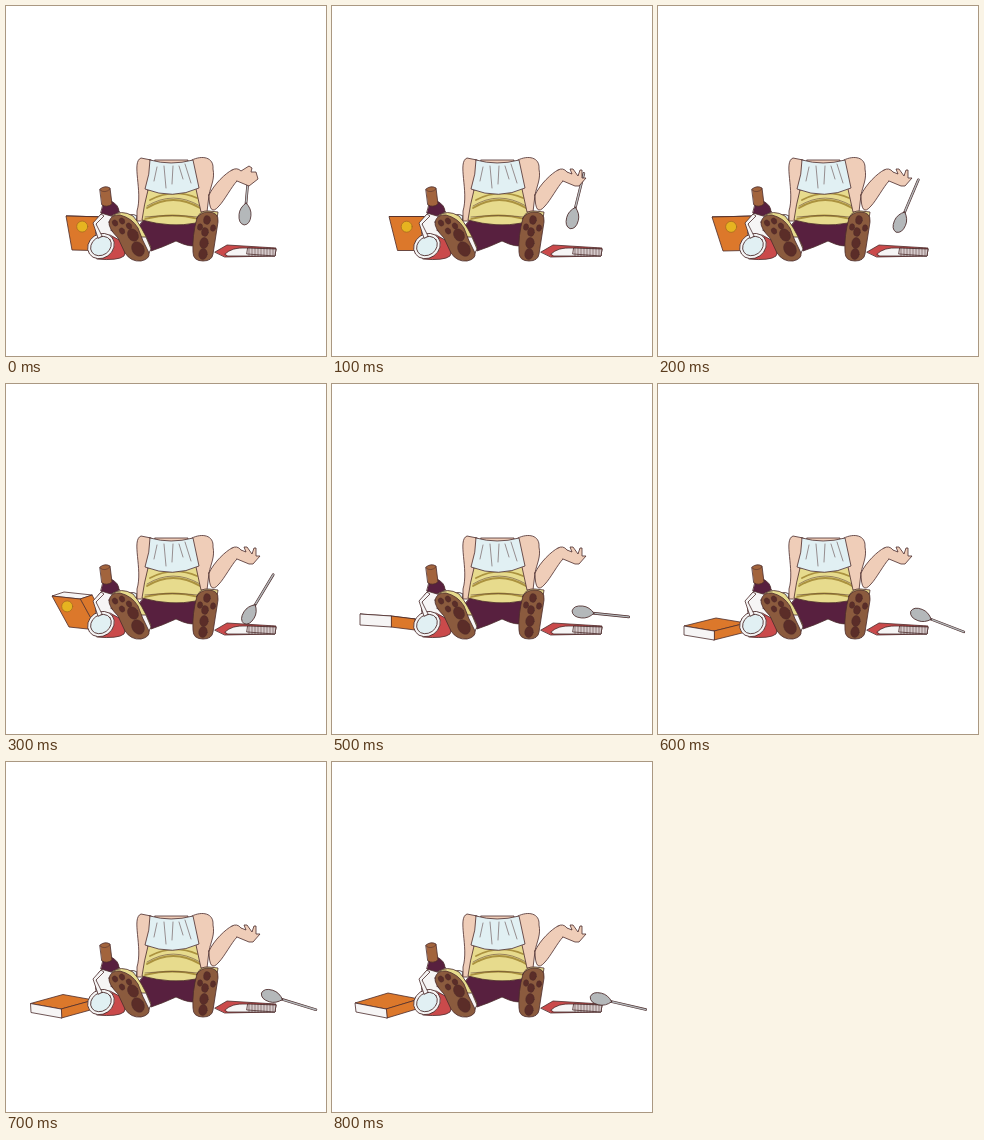
Recreate the animation shown at these times as an HTML page. Size 320x350 px, loop 0.9 s.

```html
<!DOCTYPE html>
<html lang="en">
<head>
<meta charset="utf-8">
<title>Dropped snacks</title>
<style>
html, body { margin: 0; width: 100%; height: 100%; overflow: hidden; background: #fff; }
svg { display: block; width: 320px; height: 350px; stroke: #4b2b2b; stroke-width: .8; stroke-linejoin: round; stroke-linecap: round; }
.line { fill: none; stroke-width: .5; }
.skin { fill: #efcdb8; }
.cloth { fill: #e1f0f3; }
.shirt { fill: #e7db8d; }
.plum { fill: #58203f; }
.sole { fill: #8b5b3e; }
.pad { fill: #5b2d28; stroke-width: .4; }
.white { fill: #f6f5f5; }
.orange { fill: #dc782b; }
.red { fill: #ca4a4b; }
.metal { fill: #b4b8ba; }
.cork { fill: #a2643d; }
.band { stroke: #ab923f; stroke-width: 1.8; fill: none; }
</style>
</head>
<body>
<svg viewBox="0 0 320 350">
  <g id="box">
    <polygon id="top"/>
    <polygon id="right"/>
    <polygon id="left"/>
    <circle id="badge" r="5.5" fill="#e6b420" stroke="#a96b20"/>
  </g>

  <g id="bottle">
    <path class="white" d="M97 206L113 205Q121 214 112 239L91 236Q86 214 97 206Z"/>
    <path class="plum" d="M97 199L105 195Q113 199 113 206L105 210L95 207Z"/>
    <path class="plum" d="M105 224L111 222L115 231Z"/>
    <path class="cork" d="M94 183Q99 179 104 182L106 198Q101 202 96 199Z"/>
    <path class="line" d="M94 184Q99 188 104 183"/>
  </g>

  <g id="cup">
    <path class="red" d="M104 229L117 236Q121 243 118 250Q112 255 91 253Z"/>
    <g transform="translate(95 240) rotate(-35)">
      <ellipse class="white" rx="14" ry="12"/>
      <ellipse class="cloth" rx="11" ry="9"/>
    </g>
    <path class="white" d="M92 232L87 217L95 208L98 210L90 218L96 230Z"/>
  </g>

  <g id="body">
    <path class="cloth" d="M118 212Q125 206 131 210L130 217Z"/>
    <path class="skin" d="M145 154L135 152C125 156 137 185 131 205V215H139Q138 198 144 181Z"/>
    <path class="plum" d="M138 214H191L189 239Q185 242 170 235Q157 241 145 245L132 221Z"/>
    <path class="shirt" d="M142 184L192 181L196 206L190 217Q165 222 136 214Q138 199 142 184Z"/>
    <path class="band" d="M144 194Q167 182 191 192M141 202Q167 186 194 202M139 213Q167 206 192 213"/>
    <path class="line" d="M141 200Q167 184 194 200M139 211Q167 208 192 211"/>
    <path class="skin" d="M186 154C196 149 208 151 207 163C209 173 205 179 203 189L201 206H195L190 183Z"/>
    <path class="skin" d="M203 189C208 178 220 167 226 164L236 167L231 175C226 180 218 195 213 200Q203 212 203 189Z"/>
    <path class="skin" d="M149 154H182V159H151Z"/>
    <path class="cloth" d="M144 154Q165 160 187 154L193 182Q167 194 139 183Q144 168 144 154Z"/>
    <path class="line" d="M151 161L148 175M158 160L160 182M167 160L166 178M173 160L177 173M179 158L185 177"/>
  </g>

  <g id="shoes">
    <path class="shirt" d="M106 210Q115 203 127 210Q135 219 145 241L142 249L126 238Z"/>
    <path class="white" d="M135 231H140L145 243L142 249Z"/>
    <path class="sole" d="M103 216Q105 208 114 209Q126 212 132 222Q136 234 143 247Q144 253 135 255Q125 256 119 247L112 232Q102 222 103 216Z"/>
    <path class="shirt" d="M191 212Q194 204 203 205L212 206L207 240Z"/>
    <path class="sole" d="M191 212Q195 206 202 206Q213 206 212 216L207 248Q206 255 197 255Q187 255 187 246Q186 230 191 212Z"/>
    <g id="pads" class="pad"></g>
  </g>

  <g id="book">
    <path class="red" d="M209 246L221 239L270 242L269 250L219 251Z"/>
    <path class="white" d="M219 248Q226 241 240 242L270 243L269 250H222Z"/>
    <path fill="#d6cbcc" d="M242 242L270 243L269 250L241 248Z"/>
    <path id="stripes" class="line"/>
  </g>

  <g id="spoon">
    <path d="M8 0H47" stroke-width="2.6"/>
    <path d="M8 0H47" stroke="#b4b8ba" stroke-width="1.4"/>
    <path class="metal" d="M12 0Q7 6 0 6Q-9 6-10 0Q-9-6 0-6Q7-6 12 0Z"/>
  </g>

  <path id="grip" class="skin" d="M226 164Q231 161 235 165L243 160L246 162L245 166H250L252 173L243 180L231 175"/>
  <path id="palm" class="skin" d="M226 164Q231 161 235 166L240 168L238 163H241L246 170L248 164H250V172H254L247 180H243L231 175"/>
</svg>
<script>
const STEP = 100, STEPS = 9, LANDING = 5;
const $ = id => document.getElementById(id);

// step, bowl x, bowl y, handle angle
const spoonKeys = [
  [0, 239, 209, -85], [2, 242, 217, -67], [3, 243, 231, -59],
  [5, 250, 228, 6], [6, 262, 231, 21], [8, 268, 237, 13]
];

// step, near corner, then edge vectors to the left, to the right and down
const boxKeys = [
  [0, 100, 211, -40, -1, 0, 0, 6, 34],
  [2, 98, 210, -44, 1, 0, 0, 11, 34],
  [3, 74, 215, -28, -3, 12, -4, 17, 31],
  [5, 59, 232, -31, -2, 24, 3, 0, 11],
  [6, 56, 247, -30, -5, 32, -8, 0, 9],
  [8, 54, 247, -31, -6, 33, -10, 1, 9]
];

function poseAt(keys, step) {
  const next = keys.findIndex(key => key[0] >= step);
  const b = keys[next], a = keys[Math.max(0, next - 1)];
  const mix = a === b ? 0 : (step - a[0]) / (b[0] - a[0]);
  return a.map((v, i) => v + (b[i] - v) * mix).slice(1);
}

function set(id, attributes) {
  for (const name in attributes) $(id).setAttribute(name, attributes[name]);
}

const pads = (tilt, spots) => spots.map(([x, y, r]) =>
  `<ellipse rx="${r * .85}" ry="${r * 1.1}" transform="translate(${x} ${y}) rotate(${tilt})"/>`).join("");

$("pads").innerHTML =
  pads(-30, [[109, 217, 3], [116, 215, 3], [123, 220, 3], [116, 225, 3], [127, 229, 6], [132, 243, 7]]) +
  pads(8, [[201, 214, 4], [194, 221, 3], [207, 222, 3], [199, 226, 4], [198, 237, 5], [197, 248, 5]]);

set("stripes", { d: Array.from({ length: 9 }, (_, i) => `M${243 + i * 3} 242v8`).join("") });

function drawBox(step) {
  const [x, y, lx, ly, rx, ry, dx, dy] = poseAt(boxKeys, step);
  const landed = step >= LANDING;
  const corner = (l, r, d) => [x + l * lx + r * rx + d * dx, y + l * ly + r * ry + d * dy];
  const face = (...corners) => corners.map(c => corner(...c)).join(" ");
  const [cx, cy] = corner(.64, 0, .3);
  set("left", { points: face([0, 0, 0], [1, 0, 0], [1, 0, 1], [0, 0, 1]), class: landed ? "white" : "orange" });
  set("right", { points: face([0, 0, 0], [0, 1, 0], [0, 1, 1], [0, 0, 1]), class: "orange" });
  set("top", { points: face([0, 0, 0], [1, 0, 0], [1, 1, 0], [0, 1, 0]), class: landed ? "orange" : "white" });
  set("badge", { cx, cy, visibility: landed ? "hidden" : "visible" });
}

function draw(step) {
  const [x, y, angle] = poseAt(spoonKeys, step);
  set("spoon", { transform: `translate(${x} ${y}) rotate(${angle})` });
  drawBox(step);
  $("grip").style.display = step === 0 ? "" : "none";
  $("palm").style.display = step === 0 ? "none" : "";
}

function tick() {
  draw(Math.floor(performance.now() / STEP) % STEPS);
  requestAnimationFrame(tick);
}
tick();
</script>
</body>
</html>
```
